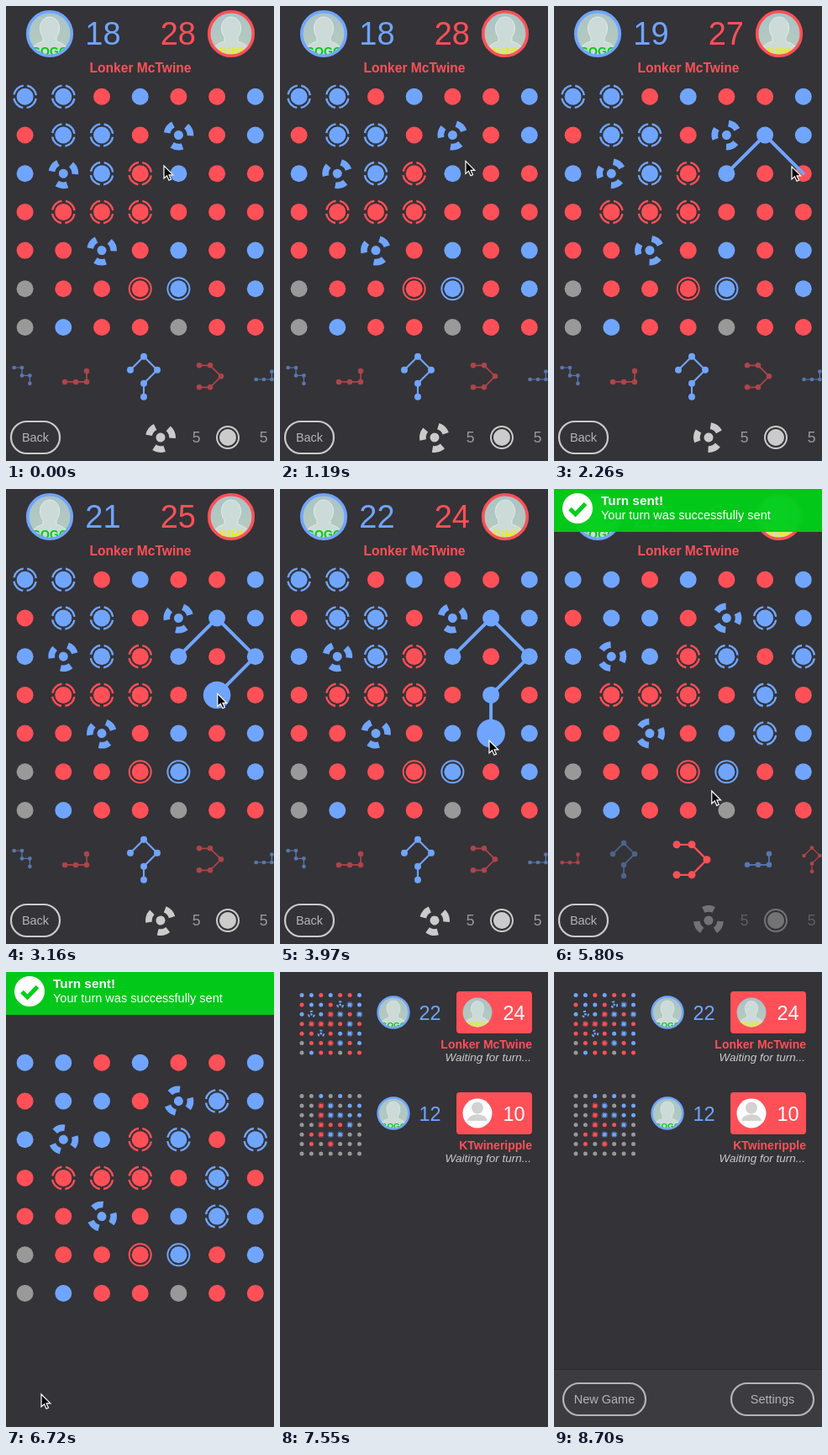
Recreate the animation shown at these times as an HTML page. Size 319 by 541 pixels, loop 8.77 s.

```html
<!DOCTYPE html>
<html lang="en">
<head>
<meta charset="utf-8">
<title>Dot game</title>
<style>
html, body { margin: 0; width: 100%; height: 100%; overflow: hidden; background: #343337; }
svg { display: block; width: 319px; height: 541px; font-family: "Liberation Sans", Arial, sans-serif; }
</style>
</head>
<body>
<svg id="stage" viewBox="0 0 319 541"></svg>
<script>
const LOOP = 8770;
const BG = '#343337', BLUE = '#70a5ff', RED = '#ff5058', GREY = '#999', PALE = '#cbcbcb';
const OPPONENT = 'Lonker McTwine', SECOND = 'KTwineripple';
const stage = document.getElementById('stage');

const clamp = v => Math.max(0, Math.min(1, v));
const lerp = (a, b, k) => a + (b - a) * k;
const smooth = k => k * k * (3 - 2 * k);
const span = (t, from, to) => smooth(clamp((t - from) / (to - from)));

// Piecewise interpolation over rows of [key, value, value...]
function track(rows, key, ease = k => k) {
  let i = 0;
  while (i < rows.length - 2 && key > rows[i + 1][0]) i++;
  const a = rows[i], b = rows[i + 1];
  const k = ease(clamp((key - a[0]) / (b[0] - a[0])));
  return a.slice(1).map((v, j) => lerp(v, b[j + 1], k));
}

const group = (body, attrs) => `<g ${attrs}>${body}</g>`;
const fade = (body, alpha) => alpha <= 0 ? '' : group(body, `opacity="${alpha}"`);
const disc = (x, y, r, fill) => `<circle cx="${x}" cy="${y}" r="${r}" fill="${fill}"/>`;
const hoop = (x, y, r, color, width, extra = '') =>
  `<circle cx="${x}" cy="${y}" r="${r}" fill="none" stroke="${color}" stroke-width="${width}" ${extra}/>`;
const text = (s, x, y, size, fill, extra = '') =>
  `<text x="${x}" y="${y}" font-size="${size}" fill="${fill}" ${extra}>${s}</text>`;
const MIDDLE = 'text-anchor="middle"', END = 'text-anchor="end"';

// Board
const colX = c => 22.6 + 45.7 * c, rowY = r => 107.8 + 45.7 * r;
const START = ['BBrbrrb', 'rBBrfrb', 'bfBRbrr', 'rRRRrrr', 'rrfrbrb', 'grrOorb', 'gbrrgrr'];
const OTHER = ['ggbgbgg', 'ggRogbb', 'ggRBBbb', 'ggRrrBg', 'grRBBgg', 'grgOggg', 'ggggggg'];
const PATH = [[4, 2], [5, 1], [6, 2], [5, 3], [5, 4]];
const HITS = [740, 1420, 2270, 3080, 3870];
const SETTLE = [4200, 4420];
const spin = t => 97 - t * .12;

function fan(x, y, color, angle) {
  const blade = `<path d="M9.2 -4.5L16.1 -7.9A18 18 0 0 1 16.1 7.9L9.2 4.5A10.2 10.2 0 0 0 9.2 -4.5Z"
    fill="${color}"/>`;
  const blades = [0, 120, 240].map(a => group(blade, `transform="rotate(${a})"`)).join('');
  return group(disc(0, 0, 5.5, color) + blades, `transform="translate(${x} ${y}) rotate(${angle})"`);
}

// Four arcs with gaps at the top, bottom and sides
function dashedRing(x, y, color, grow) {
  const r = lerp(9, 13.3, grow), step = Math.PI * r / 2;
  return hoop(x, y, r, color, 2.4 * grow,
    `stroke-dasharray="${step * .78} ${step * .22}" stroke-dashoffset="${-step * .11}"`);
}

function cell(kind, x, y, t, r = 10, grow = 1) {
  if (kind === 'f') return fan(x, y, BLUE, spin(t));
  const color = 'bBo'.includes(kind) ? BLUE : kind === 'g' ? GREY : RED;
  let s = disc(x, y, r, color);
  if ('BR'.includes(kind) && grow > 0) s += dashedRing(x, y, color, grow);
  if ('oO'.includes(kind)) s += hoop(x, y, 13, color, 2);
  return s;
}

function board(t) {
  const settled = span(t, ...SETTLE);
  let dots = '', lines = '';
  START.forEach((row, r) => [...row].forEach((kind, c) => {
    const step = PATH.findIndex(p => p[0] === c && p[1] === r);
    let radius = 10, grow = 1;
    if (step >= 0) {
      const age = (t - HITS[step]) / 230;
      if (age > 0) kind = 'B';
      if (age > 0 && age < 1) radius += 7 * Math.sin(Math.PI * age);
      grow = settled;
    } else if (kind === 'B') {
      grow = 1 - settled;
    }
    dots += cell(kind, colX(c), rowY(r), t, radius, grow);
  }));
  if (t < SETTLE[0] + 100) {
    for (let i = 1; i < PATH.length; i++) {
      const k = span(t, HITS[i] - 210, HITS[i] - 20);
      if (!k) break;
      const [x1, y1] = [colX(PATH[i - 1][0]), rowY(PATH[i - 1][1])];
      const [x2, y2] = [colX(PATH[i][0]), rowY(PATH[i][1])];
      lines += `<line x1="${x1}" y1="${y1}" x2="${lerp(x1, x2, k)}" y2="${lerp(y1, y2, k)}"
        stroke="${BLUE}" stroke-width="4" stroke-linecap="round"/>`;
    }
  }
  return dots + lines;
}

const otherBoard = t => OTHER.map((row, r) =>
  [...row].map((kind, c) => cell(kind, colX(c), rowY(r), t)).join('')).join('');

// Avatars
const DEFS = `<defs>
  <clipPath id="round"><circle r="26"/></clipPath>
  <linearGradient id="mist" x2="0" y2="1"><stop stop-color="#a9c3c8"/><stop offset="1" stop-color="#b9cdbb"/></linearGradient>
</defs>`;

function avatar(x, y, scale, rim, label, labelColor) {
  const body = `<circle r="27" fill="url(#mist)"/>
    <path d="M-24 27Q-23 13 -8 9L-8 4Q-13 -3 -11 -11Q-8 -20 0 -20Q8 -20 11 -11Q13 -3 8 4L8 9Q23 13 24 27Z"
      fill="#cddbd8" stroke="#e1e9e6"/>` +
    text(label, 0, 26, 14, labelColor, MIDDLE + ' font-weight="bold"');
  return group(group(body, 'clip-path="url(#round)"') + (rim ? hoop(0, 0, 26.3, rim, 3.6) : ''),
    `transform="translate(${x} ${y}) scale(${scale})"`);
}
const plainAvatar = (x, y) => disc(x, y, 17.5, '#fff') + disc(x, y - 6.5, 7, '#d2d2d2') +
  `<path d="M${x - 12} ${y + 9}Q${x - 11} ${y + 2} ${x} ${y + 1}Q${x + 11} ${y + 2} ${x + 12} ${y + 9}Z" fill="#d2d2d2"/>`;

function header(t) {
  const gained = HITS.slice(1).filter(h => t >= h).length;
  return avatar(52, 33, 1, BLUE, 'GOGO', '#0c1') + avatar(268, 33, 1, RED, 'HUHU', '#ee0') +
    text(18 + gained, 115.5, 46, 38, BLUE, MIDDLE) + text(28 - gained, 204.8, 46, 38, RED, MIDDLE) +
    text(OPPONENT, 160, 79, 15.6, RED, MIDDLE + ' font-weight="bold"');
}

// Strip of patterns
const STAIRS = [[-1, -1], [0, -1], [0, 0], [1, 0], [1, 1]];
const HOOK = [[-1, .5], [0, .5], [1, .5], [1, -.5]];
const KITE = [[-1, -.5], [0, -1.5], [1, -.5], [0, .5], [0, 1.5]];
const ARROW = [[-1, -1], [0, -1], [1, 0], [0, 1], [-1, 1]];
const QUEUE = [[STAIRS, BLUE], [HOOK, RED], [KITE, BLUE], [ARROW, RED], [HOOK, BLUE]];
// Carousel curve: slot, x, y, size
const SLOTS = [[-3.3, -45, 439, 4], [-2.3, 5, 439, 7], [-2, 19, 439.4, 9.4], [-1.3, 58, 440, 12], [-1, 83, 440.4, 13],
  [-.3, 139, 440.7, 15], [0, 164, 440.8, 16], [.7, 224, 440.5, 13.6], [1, 243, 440.3, 13], [2, 307, 439.3, 9.4]];

function pattern(nodes, color, x, y, unit, alpha) {
  const pts = nodes.map(([u, v]) => [x + u * unit, y + v * unit]);
  return fade(`<polyline points="${pts.join(' ')}" fill="none" stroke="${color}" stroke-width="${unit * .13}"/>` +
    pts.map(([px, py]) => disc(px, py, unit * .25, color)).join(''), alpha);
}

function strip(t) {
  const [shift] = track([[4600, 0], [5000, -1.3], [5450, -1]], t, smooth);
  const turned = span(t, 4600, 4850);
  let s = QUEUE.map(([nodes, color], i) => {
    const [x, y, unit] = track(SLOTS, i - 2 + shift);
    const alpha = i === 2 ? lerp(1, .42, turned) : i === 3 ? lerp(.6, 1, turned) : .6;
    return pattern(nodes, color, x, y, i === 3 ? unit + 2 * turned : unit, alpha);
  }).join('');
  if (t > 4600) {
    const [x, unit] = track([[4600, 164, 16], [5000, 273, 16.4], [5450, 307, 9.4]], t, smooth);
    s += pattern(KITE, RED, x, 440.7, unit, .6 * turned);
  }
  return s;
}

// Controls and menu
const pill = (x, y, w, h, label, color) =>
  `<rect x="${x}" y="${y}" width="${w}" height="${h}" rx="${h / 2}" fill="none" stroke="${color}" stroke-width="2.2"/>` +
  text(label, x + w / 2, y + h / 2 + 5, 14.5, '#b4b4b6', MIDDLE);

function controls(t) {
  const angle = t < 4600 ? spin(t) : -90;
  const tools = fan(184, 513, PALE, angle) + text(5, 226.5, 519, 17.5, GREY, MIDDLE) +
    disc(264, 513, 10, PALE) + hoop(264, 513, 13, PALE, 2) + text(5, 306.5, 519, 17.5, GREY, MIDDLE);
  return pill(6, 494, 58, 38, 'Back', PALE) + fade(tools, lerp(1, .42, span(t, 4550, 4800)));
}

const menuRow = (y, mine, theirs, name, face) =>
  avatar(135, y + 48, .7, BLUE, 'GOGO', '#0c1') + text(mine, 178.5, y + 57, 23.5, BLUE, MIDDLE) +
  `<rect x="210" y="${y + 23}" width="90" height="50" rx="4" fill="${RED}"/>` + face +
  text(theirs, 278.5, y + 57, 23.5, '#fff', MIDDLE) +
  text(name, 300, y + 91, 14, RED, END + ' font-weight="bold"') +
  text('Waiting for turn...', 299, y + 106, 13.5, PALE, END + ' font-style="italic"');

function menu(t) {
  return menuRow(0, 22, 24, OPPONENT, avatar(235, 48, .67, '', 'HUHU', '#ee0')) +
    menuRow(120, 12, 10, SECOND, plainAvatar(235, 168)) +
    group(otherBoard(t), 'transform="translate(20.3 120.5) scale(.25)"');
}

const bar = `<rect y="472" width="319" height="70" fill="#3c3b3f"/><path d="M0 472.5H319" stroke="#2b2a2d"/>` +
  pill(11, 489, 98, 38, 'New Game', '#b4b4b6') + pill(211, 489, 98, 38, 'Settings', '#b4b4b6');

const banner = `<rect width="319" height="51" fill="#00cf1a" opacity=".96"/>` + disc(28, 23, 18, '#fff') +
  `<path d="M19 23.5L25.5 30L37.5 17.5" fill="none" stroke="#00cf1a" stroke-width="5"/>` +
  text('Turn sent!', 56, 18.5, 15.4, '#fff', 'font-weight="bold"') +
  text('Your turn was successfully sent', 56, 35.5, 14.5, '#fff');

const POINTER = [[0, 188, 190], [350, 188, 190], [720, 207, 199], [1050, 207, 199], [1420, 250, 154],
  [1900, 252, 155], [2260, 283, 191], [2420, 296, 199], [2700, 296, 199], [3080, 252, 243],
  [3500, 250, 247], [3870, 249, 299], [5520, 249, 299], [6300, 42, 502], [LOOP, 42, 502]];
const arrow = `<path d="M0 0V15L3.5 11.8L6 17.3L8.5 16.2L6.1 10.9H10.8Z" fill="#000" stroke="#fff" stroke-width="1.2"/>`;

function draw(t) {
  const out = 1 - span(t, 6430, 6700);
  const zoom = span(t, 6930, 7400);
  const boardAt = `transform="translate(${20.3 * zoom} ${.5 * zoom}) scale(${lerp(1, .25, zoom)})"`;
  const drop = span(t, 4620, 4900) - span(t, 6950, 7220);
  const rise = span(t, 7570, 7780);
  let s = DEFS + `<rect width="319" height="541" fill="${BG}"/>`;
  if (out > 0) s += fade(header(t) + strip(t) + controls(t), out);
  if (t > 7150) s += fade(menu(t), span(t, 7150, 7450));
  s += group(board(t), boardAt);
  if (rise > 0) s += group(bar, `transform="translate(0 ${70 * (1 - rise)})"`);
  if (drop > 0) s += group(banner, `transform="translate(0 ${-51 * (1 - drop)})"`);
  if (t < 6930) s += group(arrow, `transform="translate(${track(POINTER, t, smooth)})"`);
  stage.innerHTML = s;
}

const began = performance.now();
function tick() {
  draw((performance.now() - began) % LOOP);
  requestAnimationFrame(tick);
}
tick();
</script>
</body>
</html>
```
